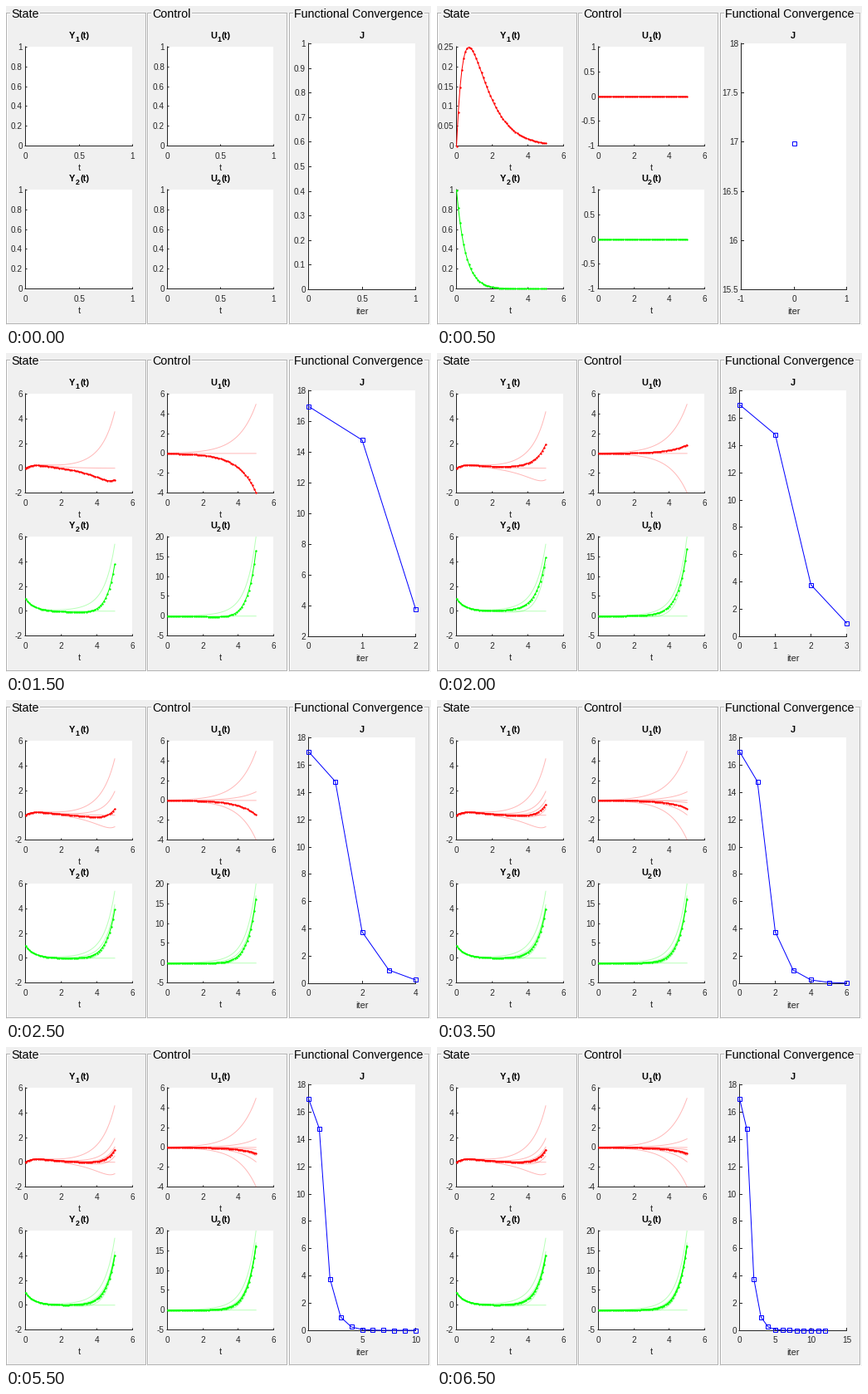
Recreate the animation shown at these times as a matplotlib script. Size 512 by 384 pixels, loop 7 s.

```python
import numpy as np
import matplotlib.pyplot as plt
from matplotlib.animation import FuncAnimation
from matplotlib.patches import Rectangle

W, H = 512, 384
PX = 0.72  # points per pixel at 100 dpi
FRAMES = 14
INK = "#262626"
RED, GREEN, BLUE = "#ff0000", "#00ff00", "#0000ff"

plt.rcParams["font.family"] = "Liberation Sans"
fig = plt.figure(figsize=(W / 100, H / 100), dpi=100, facecolor="#f0f0f0")
page = fig.add_axes([0, 0, 1, 1])

# Gradient descent for y1' = -y1 + y2 + u1, y2' = -2 y2 + u2, y(0) = (0, 1)
T = 5
GOAL = np.array([1.0, 4.0])
EFFORT = 0.0004  # weight of the control energy in J
time = np.linspace(0, T, 51)


def solve(a, b):
    """Controls u1 = a e^-s, u2 = a e^-s + b e^-2s with s = T - t."""
    slow, fast = np.exp(time - T), np.exp(2 * (time - T))
    p1 = 2 * a / 3 * slow + b / 12 * fast
    p2 = a / 3 * slow + b / 4 * fast
    c = 1 - p2[0]
    y1 = p1 + c * (np.exp(-time) - np.exp(-2 * time)) - p1[0] * np.exp(-time)
    y2 = p2 + c * np.exp(-2 * time)
    return y1, y2, a * slow, a * slow + b * fast


def descend(count):
    a = b = 0.0
    runs, costs = [], []
    for i in range(count):
        y1, y2, u1, u2 = run = solve(a, b)
        err = np.array([y1[-1], y2[-1]]) - GOAL
        energy = np.trapezoid(u1**2 + u2**2, time)
        runs.append(run)
        costs.append(err @ err + EFFORT * energy)
        step = 5 if i == 0 else 2.5
        a -= step * err[0]
        b -= step * (err[1] - err[0])
    return runs, costs


runs, costs = descend(FRAMES - 1)

# (low, high, tick step) for Y1, Y2, U1, U2, J
UNIT = (0, 1, 0.2)
VIEWS = [
    [UNIT, UNIT, UNIT, UNIT, (0, 1, 0.1)],
    [(0, 0.25, 0.05), UNIT, (-1, 1, 0.5), (-1, 1, 0.5), (15.5, 18, 0.5)],
    [(0, 5, 1), (0, 6, 2), (0, 5, 1), (0, 20, 5), (14.5, 17, 0.5)],
    [(-2, 6, 2), (-2, 6, 2), (-4, 6, 2), (-5, 20, 5), (2, 18, 2)],
    [(-2, 6, 2), (-2, 6, 2), (-4, 6, 2), (-5, 20, 5), (0, 18, 2)],
]

# left, right, top, bottom at pixel centres
BOXES = [
    (23.5, 152.5, 49.5, 168.5),
    (23.5, 152.5, 221.5, 340.5),
    (194.5, 322.5, 49.5, 168.5),
    (194.5, 322.5, 221.5, 340.5),
]
NAMES = ["Y1", "Y2", "U1", "U2"]
COLORS = [RED, GREEN, RED, GREEN]


def iter_view(n):
    if n == 0:
        return -1, 1, 1
    if n == 1:
        return 0, 1, 0.5
    if n <= 3:
        return 0, n, 1
    if n <= 6:
        return 0, 2 * ((n + 1) // 2), 2
    return 0, 5 * ((n + 4) // 5), 5


def rect(x, y, w, h, color, z=0):
    page.add_patch(Rectangle((x, y), w, h, fc=color, lw=0,
                             antialiased=False, zorder=z))


def line(x, y, color=INK, z=2, **kw):
    page.plot(x, y, color=color, lw=PX, zorder=z, snap=False, **kw)


def square(x, y):
    page.add_patch(Rectangle((np.floor(x) - 1.5, np.floor(y) - 1.5), 5, 5, fc="none",
                             ec=BLUE, lw=PX, snap=False, zorder=5))


def text(x, y, s, size=10, color=INK, **kw):
    page.text(x, y, s, fontsize=size * PX, color=color, va="baseline", zorder=6, **kw)


def frame_box(x, y, w, h, color):
    rect(x, y, w, 1, color)
    rect(x, y + h - 1, w, 1, color)
    rect(x, y, 1, h, color)
    rect(x + w - 1, y, 1, h, color)


def group(x, title, title_w):
    frame_box(x + 1, 9, 169, 375, "#ffffff")
    frame_box(x, 8, 169, 375, "#b2b2b2")
    rect(x + 5, 3, title_w + 3, 12, "#f0f0f0", 1)
    text(x + 6, 14, title, 14.3, "black")


def ticks(view):
    low, high, step = view
    return low + step * np.arange(round((high - low) / step) + 1)


def label(v):
    return f"{round(v, 6) + 0:g}"


def centre(v):
    return np.floor(v + 1e-6) + 0.5


def axes(box, xview, yview, xname, tick, drop):
    """Draw an empty plot and return its data-to-pixel map."""
    left, right, top, bottom = box
    x0, y0 = int(left), int(top)
    rect(x0, y0, int(right) - x0, int(bottom) + 1 - y0, "white", 1)

    def to_px(x, y):
        u = (np.asarray(x) - xview[0]) / (xview[1] - xview[0])
        v = (np.asarray(y) - yview[0]) / (yview[1] - yview[0])
        return left + u * (right - left), bottom - v * (bottom - top)

    line([left - 0.5, right], [bottom, bottom])
    line([left, left], [bottom, top - 0.5])
    for v in ticks(xview):
        x = centre(to_px(v, yview[0])[0])
        line([x, x], [bottom, bottom - tick])
        text(x, bottom + drop, label(v), ha="center")
    for v in ticks(yview):
        y = centre(to_px(xview[0], v)[1])
        line([left, left + tick], [y, y])
        text(left - 3.5, y + 3.6, label(v), ha="right")
    text((left + right) / 2, bottom + 29.5, xname, 11, ha="center")
    return to_px


def title(cx, y, name):
    bold = dict(color="black", weight="bold")
    text(cx - 12, y, name[0], 11, **bold)
    text(cx - 4.5, y + 4, name[1], 8.8, **bold)
    text(cx + 1, y, "(t)", 11, **bold)


def draw(k):
    page.clear()
    page.set(xlim=(0, W), ylim=(H, 0))
    page.axis("off")
    group(0, "State", 33)
    group(170, "Control", 46)
    group(341, "Functional Convergence", 155)

    views = VIEWS[min(k, 4)]
    tview = (0, 6, 2) if k else (0, 1, 0.5)
    for j, box in enumerate(BOXES):
        to_px = axes(box, tview, views[j], "t", 1.5, 15)
        title((box[0] + box[1]) / 2, box[2] - 10.5, NAMES[j])
        for i in range(k):
            x, y = to_px(time, runs[i][j])
            if i < k - 1:
                line(x, y, COLORS[j], 3, alpha=0.28)
            else:
                line(x, y, COLORS[j], 4, marker="o", ms=2.4 * PX, mew=0)

    left = 366.5 if k in (1, 2) else 364.5
    xview = iter_view(k - 1) if k else (0, 1, 0.5)
    to_px = axes((left, 493.5, 45.5, 341.5), xview, views[4], "iter", 3, 14.5)
    text(429, 39, "J", 11, "black", weight="bold", ha="center")
    if k:
        x, y = to_px(np.arange(k), costs[:k])
        line(x, y, BLUE, 4)
        for point in zip(x, y):
            square(*point)


anim = FuncAnimation(fig, draw, frames=FRAMES, interval=500,
                     repeat=True, repeat_delay=0)
plt.show()
```
